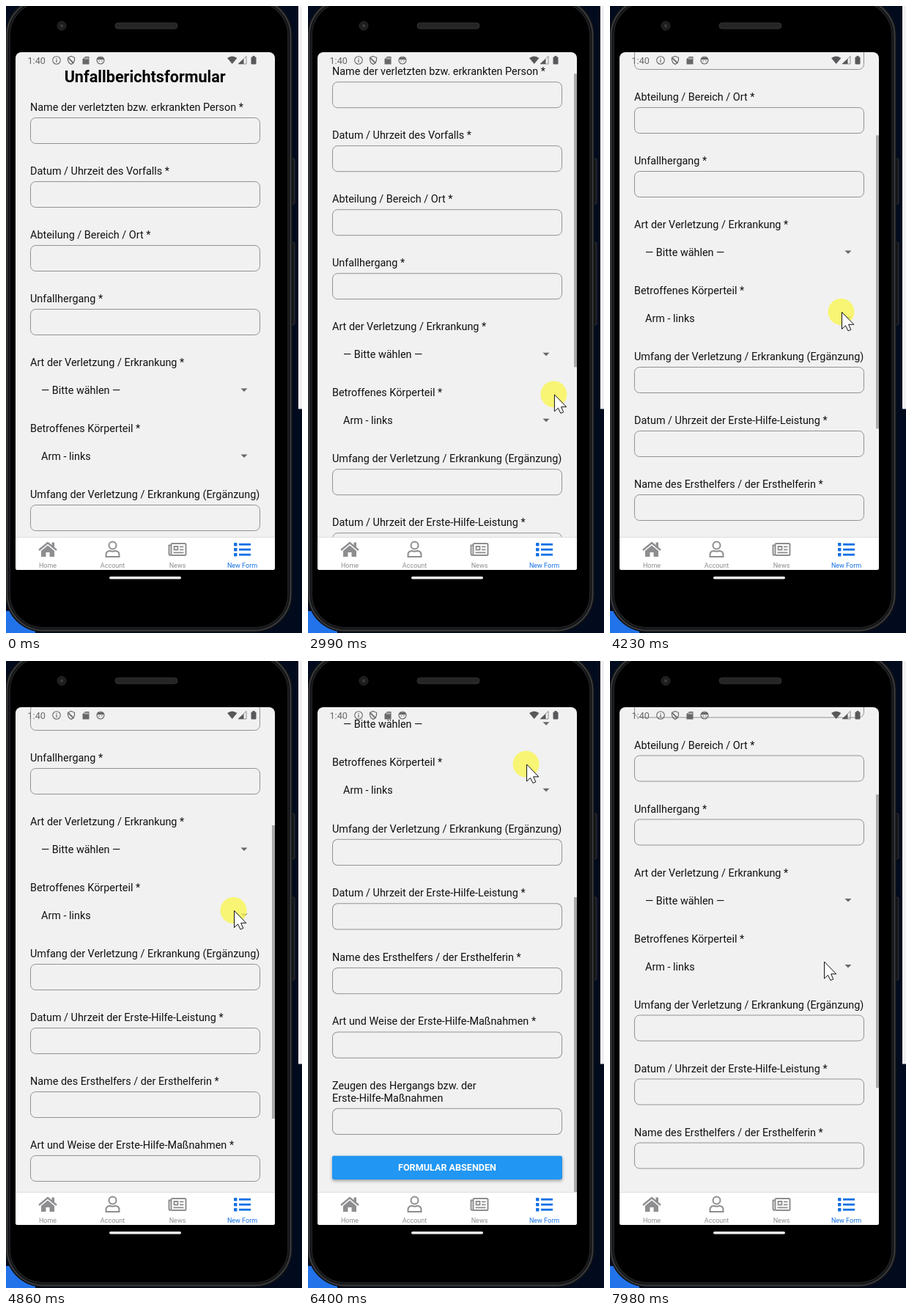
An HTML page with a canvas for the animation above (8000 ms loop, 404 by 855 pixels).

```html
<!DOCTYPE html>
<html lang="de">
<head>
<meta charset="utf-8">
<title>Unfallberichtsformular</title>
<style>
html, body { margin: 0; width: 100%; height: 100%; overflow: hidden; background: #020b1e; }
canvas { display: block; width: 404px; height: 855px; }
</style>
</head>
<body>
<canvas id="stage"></canvas>
<script>
const W = 404, H = 855, LOOP = 8000;
const TOP = 63, BOTTOM = 725, MAX_SCROLL = 434;
const GREY = '#8e8e90', BLUE = '#1270e4', STATUS = '#68686a';
const canvas = document.getElementById('stage');
const ctx = canvas.getContext('2d');
const dpr = window.devicePixelRatio || 1;
canvas.width = W * dpr;
canvas.height = H * dpr;

// Moving phases: first step, last step, number of steps
const PHASES = [
  [460, 590, 3], [860, 1480, 10], [1880, 2230, 6], [2380, 3470, 17],
  [3670, 4860, 18], [5060, 7440, 35], [7700, 7980, 5]
];

// Pointer and scroll: time, x, y, scroll
const KEYS = [
  [460, 379, 794, 0], [530, 352, 670, 0], [590, 339, 619, 0], [790, 339, 619, 0],
  [1130, 320, 570, 0], [1480, 342, 610, 0], [1810, 342, 610, 0], [2090, 348.5, 624.5, 0],
  [2230, 349, 628, 0], [2310, 349, 628, 0], [2520, 346, 612, 0], [2800, 340, 568, 14],
  [2990, 336, 530, 48], [3130, 332, 502, 84], [3300, 328, 474, 122], [3470, 324, 460, 147],
  [3600, 324, 460, 147], [3950, 319, 436, 168], [4230, 316, 417, 188], [4540, 313, 378, 222],
  [4860, 311, 340, 267], [4990, 311, 340, 267], [5300, 308, 290, 308], [5550, 305, 227, 362],
  [5840, 301, 180, 412], [6050, 300, 158, 440], [6400, 298, 140, 467], [6680, 297, 138, 469],
  [6750, 297, 142, 466], [7000, 296, 230, 385], [7250, 294, 320, 295], [7440, 293, 365, 242],
  [7630, 293, 365, 242], [7980, 292, 409.5, 197.5]
];
const PRESS = 2450, RELEASE = 7950;

// Label baseline and text; inputs sit 9px under the last line
const INPUTS = [
  [143, 'Name der verletzten bzw. erkrankten Person *'],
  [230, 'Datum / Uhrzeit des Vorfalls *'],
  [317, 'Abteilung / Bereich / Ort *'],
  [404, 'Unfallhergang *'],
  [671, 'Umfang der Verletzung / Erkrankung (Ergänzung)'],
  [758, 'Datum / Uhrzeit der Erste-Hilfe-Leistung *'],
  [845, 'Name des Ersthelfers / der Ersthelferin *'],
  [932, 'Art und Weise der Erste-Hilfe-Maßnahmen *'],
  [1019, 'Zeugen des Hergangs bzw. der', 'Erste-Hilfe-Maßnahmen']
];
const SELECTS = [
  [491, 'Art der Verletzung / Erkrankung *', '— Bitte wählen —'],
  [581, 'Betroffenes Körperteil *', 'Arm - links']
];

function stepTime(t) {
  let time = 0;
  for (const [start, end, count] of PHASES) {
    if (t < start) break;
    const step = (end - start) / (count - 1);
    time = Math.min(end, start + Math.floor((t - start) / step + 0.2) * step);
  }
  return time;
}

function poseAt(t) {
  let i = 1;
  while (i < KEYS.length - 1 && KEYS[i][0] < t) i++;
  const a = KEYS[i - 1], b = KEYS[i];
  const u = Math.max(0, Math.min(1, (t - a[0]) / (b[0] - a[0])));
  const mix = k => a[k] + (b[k] - a[k]) * u;
  return { x: mix(1), y: mix(2), scroll: mix(3) };
}

function text(str, x, y, size, color = '#111', weight = 400, align = 'left') {
  ctx.font = `${weight} ${size}px Roboto, sans-serif`;
  ctx.textAlign = align;
  ctx.fillStyle = color;
  ctx.fillText(str, x, y);
}

function rect(x, y, w, h, color) {
  ctx.fillStyle = color;
  ctx.fillRect(x, y, w, h);
}

function box(x, y, w, h, r, fill, stroke, line = 1) {
  ctx.beginPath();
  ctx.roundRect(x, y, w, h, r);
  paint(fill, stroke, line);
}

function disc(x, y, r, fill, stroke, line = 1) {
  ctx.beginPath();
  ctx.arc(x, y, r, 0, Math.PI * 2);
  paint(fill, stroke, line);
}

function poly(points, fill, stroke, line = 1) {
  ctx.beginPath();
  for (let i = 0; i < points.length; i += 2) ctx.lineTo(points[i], points[i + 1]);
  ctx.closePath();
  paint(fill, stroke, line);
}

function paint(fill, stroke, line) {
  if (fill) { ctx.fillStyle = fill; ctx.fill(); }
  if (stroke) { ctx.strokeStyle = stroke; ctx.lineWidth = line; ctx.stroke(); }
}

function drawPhone() {
  rect(0, 0, W, H, '#020b1e');
  rect(0, 825, 40, 30, '#2273ea');
  rect(399, 0, 5, 549.5, '#f1f1f3');
  box(388, 208, 6, 62, 2, '#17181a', '#303134');
  box(388, 322, 6, 113, 2, '#17181a', '#303134');
  box(-1, -12, 392, 866, 52, '#101112');
  box(1.5, -9.5, 387, 861, 50, null, '#3b3c3f', 2);
  box(5, -6, 380, 854, 46, '#000', '#1d1e20', 2);
  box(149, 23, 85, 8, 4, '#252526', '#333334');
  disc(76, 27, 6, '#1d1d1e', '#2b2b2c');
  disc(76, 27, 2.2, '#39393b');
  box(141, 778, 98, 3.5, 1.75, '#f4f4f4');
}

function drawForm(scroll) {
  const s = Math.min(scroll, MAX_SCROLL);
  const stretch = 1 + Math.max(0, scroll - MAX_SCROLL) * 0.00021;
  ctx.save();
  ctx.translate(0, BOTTOM);
  ctx.scale(1, stretch);
  ctx.translate(0, -BOTTOM);
  ctx.save();
  ctx.translate(0, -s);
  text('Unfallberichtsformular', 189.7, 104, 21.6, '#000', 700, 'center');
  for (const [y, ...lines] of INPUTS) {
    lines.forEach((str, i) => text(str, 33, y + i * 17, 14.4));
    const top = y + (lines.length - 1) * 17 + 9;
    box(33.5, top + 0.5 - (lines.length > 1 ? 0.5 : 0), 313, 35, 7, null, '#929292');
  }
  for (const [y, label, value] of SELECTS) {
    text(label, 33, y, 14.4);
    text(value, 48, y + 38, 14.4);
    poly([320.5, y + 30.5, 329.5, y + 30.5, 325, y + 35], '#68686a');
  }
  ctx.shadowColor = 'rgba(0,0,0,.35)';
  ctx.shadowBlur = 4 * dpr;
  ctx.shadowOffsetY = 2 * dpr;
  box(33, 1109, 314, 32, 2, '#2196f3');
  ctx.shadowColor = 'transparent';
  text('FORMULAR ABSENDEN', 190, 1129.5, 12.6, '#fff', 700, 'center');
  ctx.restore();
  if (scroll > 0) rect(363, TOP + s * 0.603, 4, 400, '#aaaaab');
  ctx.restore();
}

function drawStatus() {
  text('1:40', 29.5, 78.5, 12.6, STATUS);
  disc(69, 74, 5.3, null, STATUS, 1.1);
  rect(68.4, 73, 1.2, 4, STATUS);
  rect(68.4, 71, 1.2, 1.2, STATUS);
  poly([89, 68.5, 93.5, 70.3, 93.5, 74, 92, 77.5, 89, 79.5, 86, 77.5, 84.5, 74, 84.5, 70.3], null, STATUS, 1.2);
  poly([85.5, 70, 93, 77.5, 91.5, 78.5, 85, 72], STATUS);
  poly([108, 69, 113.5, 69, 113.5, 79.5, 104.5, 79.5, 104.5, 72.5], STATUS);
  for (let i = 0; i < 3; i++) rect(107.3 + i * 2, 70.3, 1, 2.3, '#f1f1f1');
  disc(129, 74, 5, null, STATUS, 1.2);
  rect(125, 70, 8, 3.2, STATUS);
  disc(127.2, 75, 0.7, STATUS);
  disc(130.8, 75, 0.7, STATUS);
  ctx.beginPath();
  ctx.moveTo(308.7, 79);
  ctx.lineTo(302, 71);
  ctx.quadraticCurveTo(308.7, 66, 315.4, 71);
  ctx.closePath();
  paint('#58585a');
  poly([328, 68.5, 328, 79, 317, 79], null, '#777779', 0.8);
  poly([324.5, 72, 324.5, 79, 317, 79], '#58585a');
  box(334.5, 69.5, 7, 10, 1, '#58585a');
  rect(336.5, 68, 3, 2, '#58585a');
}

function drawTabs() {
  rect(13, BOTTOM - 0.5, 354, 46, '#fff');
  rect(13, BOTTOM - 1, 354, 1, '#dfdfdf');

  // Home
  ctx.lineJoin = 'miter';
  ctx.beginPath();
  ctx.moveTo(45, 742);
  ctx.lineTo(57, 732);
  ctx.lineTo(69, 742);
  paint(null, GREY, 2.4);
  rect(62.5, 731.5, 3.5, 7, GREY);
  poly([57, 735.5, 66, 743, 66, 751, 59.5, 751, 59.5, 745, 54.5, 745, 54.5, 751, 48, 751, 48, 743], GREY);

  // Account
  disc(145.5, 735.5, 5, null, GREY, 2);
  ctx.beginPath();
  ctx.moveTo(136.5, 751);
  ctx.lineTo(136.5, 748.5);
  ctx.quadraticCurveTo(136.5, 743, 142, 743);
  ctx.quadraticCurveTo(145.5, 744.5, 149, 743);
  ctx.quadraticCurveTo(154.5, 743, 154.5, 748.5);
  ctx.lineTo(154.5, 751);
  ctx.closePath();
  paint(null, GREY, 2);

  // News
  box(225.5, 733, 20, 16, 1.5, null, GREY, 2);
  ctx.beginPath();
  ctx.moveTo(225, 735.5);
  ctx.lineTo(222.5, 735.5);
  ctx.lineTo(222.5, 747);
  ctx.quadraticCurveTo(222.5, 749, 225, 749);
  paint(null, GREY, 2);
  box(229.5, 737, 5, 4.5, 0, null, GREY, 1.8);
  for (const y of [736.5, 740.5]) rect(237, y, 5.5, 1.8, GREY);
  rect(228.5, 744.5, 14, 1.8, GREY);

  // New form
  for (const y of [732, 739, 746]) {
    box(311, y, 4.5, 4.5, 1, BLUE);
    rect(318, y + 0.8, 16, 2.8, BLUE);
  }

  ['Home', 'Account', 'News', 'New Form'].forEach((name, i) =>
    text(name, 57 + i * 88.5, 766, 9, i === 3 ? BLUE : GREY, 400, 'center'));
}

function drawPointer({ x, y }, pressed) {
  if (pressed) disc(x - 0.5, y, 18, 'rgba(250,247,90,.82)');
  ctx.save();
  ctx.translate(x, y);
  poly([0.5, 0.5, 0.5, 23.5, 5.5, 18.8, 9, 26, 12.8, 24.4, 9.6, 17.3, 16.8, 17.3], '#fff', '#111');
  ctx.restore();
}

function draw(now) {
  const t = stepTime(now % LOOP);
  const pose = poseAt(t);
  ctx.setTransform(dpr, 0, 0, dpr, 0, 0);
  drawPhone();
  ctx.save();
  ctx.beginPath();
  ctx.roundRect(13, TOP, 354, 706, [8, 8, 3, 3]);
  ctx.clip();
  rect(13, TOP, 354, 706, '#f1f1f1');
  drawForm(pose.scroll);
  drawStatus();
  drawTabs();
  ctx.restore();
  if (t >= KEYS[0][0]) drawPointer(pose, t >= PRESS && t < RELEASE);
}

const begin = performance.now();
function tick() {
  draw(performance.now() - begin);
  requestAnimationFrame(tick);
}
tick();
</script>
</body>
</html>
```
